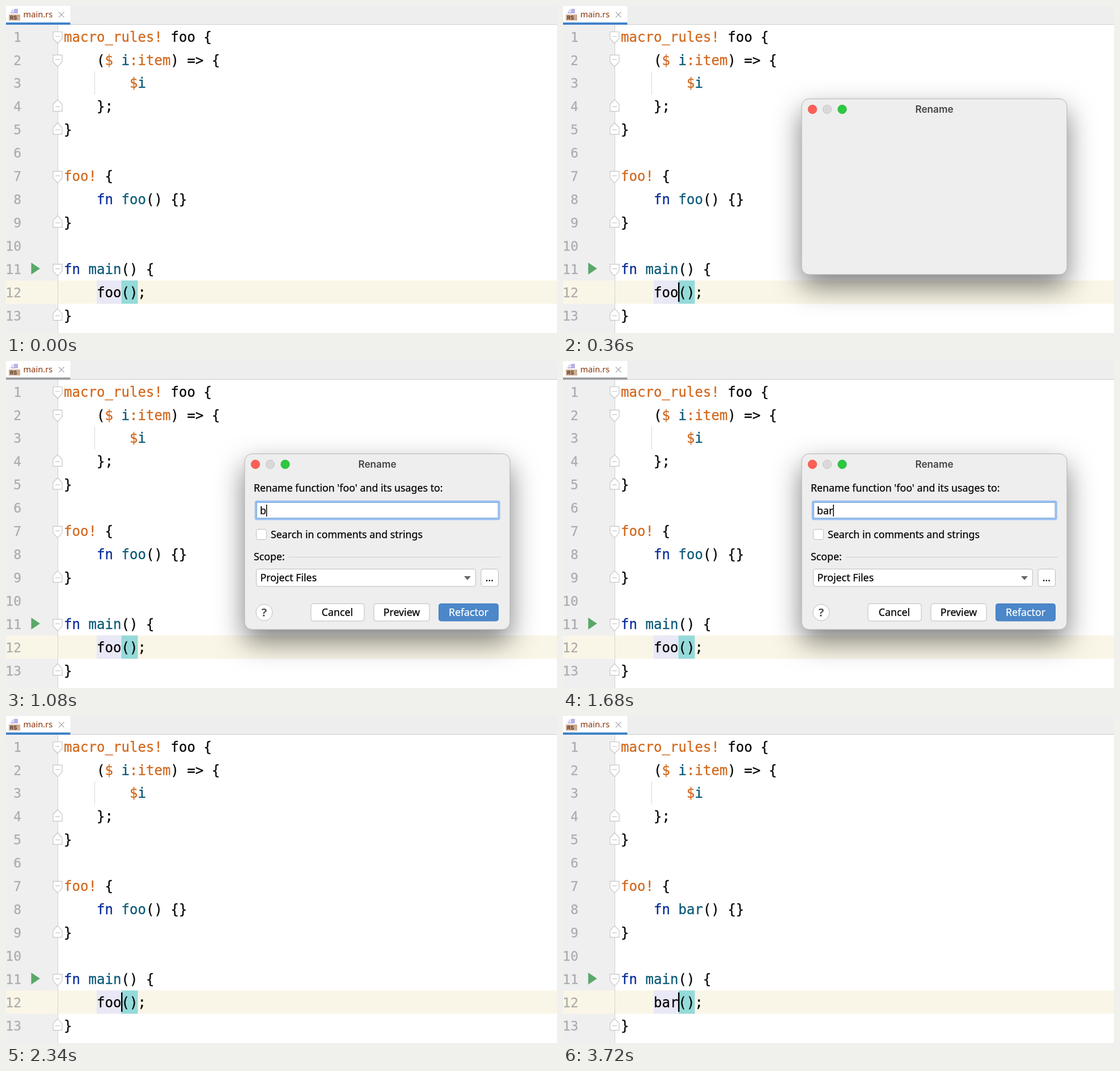
These frames come from a looping animation (972x576 px, 3780 ms). An HTML page:

```html
<!DOCTYPE html>
<html lang="en">
<head>
<meta charset="utf-8">
<title>Rename refactoring</title>
<style>
html, body { margin: 0; width: 100%; height: 100%; overflow: hidden; background: #fff; }
svg { display: block; width: 972px; height: 576px; }
.code { font: 24.08px "DejaVu Sans Mono", monospace; fill: #080808; }
.code text { stroke: #080808; stroke-width: .3px; }
.code .macro { fill: #d2691e; stroke: #d2691e; }
.code .keyword { fill: #0a2f9c; stroke: #0a2f9c; }
.code .name { fill: #0b5a78; stroke: #0b5a78; }
.code .number { font-size: 23px; fill: #adadad; stroke: #adadad; text-anchor: end; }
.ui { font: 17.8px "Noto Sans", sans-serif; fill: #000; }
.ui text { stroke: #000; stroke-width: .25px; }
.center { text-anchor: middle; }
.box { fill: #fff; stroke: #bdbdbd; }
.fold { fill: #fff; stroke: #c6c6c6; stroke-width: 1.2; }
</style>
</head>
<body>
<svg viewBox="0 0 972 576">
  <defs>
    <filter id="shadow" x="-30%" y="-40%" width="160%" height="190%" color-interpolation-filters="sRGB">
      <feDropShadow dx="0" dy="21" stdDeviation="24" flood-color="#000" flood-opacity=".5"/>
    </filter>
  </defs>

  <!-- Editor background -->
  <rect width="972" height="576" fill="#fff"/>
  <rect y="33" width="91" height="543" fill="#efefef"/>
  <rect y="483.5" width="972" height="41" fill="#faf6e7"/>
  <rect x="91" y="33" width="1" height="543" fill="#d0d0d0"/>
  <rect x="160" y="483.5" width="43.5" height="41" fill="#e9e8f6"/>
  <rect x="203.5" y="483.5" width="29" height="41" fill="#95dada"/>
  <rect x="156" y="115" width="1" height="41" fill="#d8d8d8"/>
  <path d="M44.5 452L60 462.5L44.5 473Z" fill="#59a869"/>

  <!-- Tab bar -->
  <rect width="972" height="32" fill="#eee"/>
  <rect y="32" width="972" height="1" fill="#cdcdcd"/>
  <rect width="113.5" height="32" fill="#fff"/>
  <rect id="underline" y="29" width="113.5" height="4"/>
  <path d="M14 5H21V13H8V11H14Z" fill="#b9b1e6"/>
  <path d="M8 10L13 5V10Z" fill="#d3cdf0"/>
  <rect x="5" y="15" width="20" height="10.5" fill="#cfab91"/>
  <text x="7" y="24" font-family="Inter, sans-serif" font-size="9.5" font-weight="700" fill="#5b3a27">RS</text>
  <text class="ui" x="30.5" y="20" style="font-size:14.7px;fill:#8a3208">main.rs</text>
  <path d="M93 10.5L102.5 20M102.5 10.5L93 20" stroke="#adadad" stroke-width="1.2"/>

  <g class="code" id="code"></g>
  <rect id="caret" x="203" y="487" width="2.5" height="34" fill="#000"/>

  <!-- Rename dialog -->
  <g id="dialog">
    <rect x="421" y="163.5" width="468" height="309.5" rx="13" fill="#eee" stroke="#b4b4b4" filter="url(#shadow)"/>
    <circle cx="440" cy="182" r="7.7" fill="#fe5f57" stroke="#e5534b" stroke-width=".8"/>
    <circle cx="466" cy="182" r="7.6" fill="#d9d9d9" stroke="#c5c5c5"/>
    <circle cx="492.5" cy="182" r="7.7" fill="#2bc840" stroke="#25b438" stroke-width=".8"/>
    <text class="center" x="655" y="187.5" font-family="Inter, sans-serif" font-size="17.2" font-weight="600" fill="#444">Rename</text>
    <g class="ui" id="form">
      <text x="437" y="230">Rename function 'foo' and its usages to:</text>
      <rect x="440.5" y="247.5" width="429.5" height="31" rx="2" fill="#fff" stroke="#97c0f0" stroke-width="3.4"/>
      <rect x="442.5" y="249.5" width="425.5" height="27" fill="none" stroke="#86acd8"/>
      <rect id="selection" x="448" y="252" height="23" fill="#a6d2ff"/>
      <text id="field" x="448" y="269.5"></text>
      <rect id="fieldCaret" y="253" width="1.5" height="21" fill="#000"/>
      <rect class="box" x="441.5" y="296.5" width="18" height="18" rx="3"/>
      <text x="467" y="312">Search in comments and strings</text>
      <text x="437" y="351">Scope:</text>
      <rect x="499" y="345" width="374" height="1" fill="#cfcfcf"/>
      <rect class="box" x="441.5" y="366.5" width="387" height="30.5" rx="4"/>
      <text x="448.5" y="388">Project Files</text>
      <path d="M808 379H820L814 386Z" fill="#666"/>
      <rect class="box" x="838" y="366.5" width="30.5" height="30.5" rx="4"/>
      <text class="center" x="853" y="388">...</text>
      <circle class="box" cx="455.5" cy="443" r="14.5"/>
      <text class="center" x="455.5" y="450" style="font-size:20px;font-weight:600;fill:#555;stroke:none">?</text>
      <rect class="box" x="538" y="427.5" width="94" height="30.5" rx="4"/>
      <text class="center" x="584.5" y="449">Cancel</text>
      <rect class="box" x="649" y="427.5" width="98" height="30.5" rx="4"/>
      <text class="center" x="698" y="449">Preview</text>
      <rect x="763.5" y="427.5" width="105" height="30.5" rx="4" fill="#4c87c9" stroke="#457fc0"/>
      <text class="center" x="816" y="449" style="fill:#fff;stroke:#fff">Refactor</text>
    </g>
  </g>
</svg>
<script>
const LOOP = 3780;
const $ = id => document.getElementById(id);
const lineCenter = line => 54 + (line - 1) * 40.93;
const columnX = column => 102 + column * 14.5;

// line, column, text, style
const code = [
  [1, 0, "macro_rules!", "macro"], [1, 13, "foo {"],
  [2, 4, "("], [2, 5, "$", "macro"], [2, 7, "i", "name"], [2, 8, ":item", "macro"], [2, 13, ") => {"],
  [3, 8, "$", "macro"], [3, 9, "i", "name"],
  [4, 4, "};"], [5, 0, "}"],
  [7, 0, "foo!", "macro"], [7, 5, "{"],
  [8, 4, "fn", "keyword"], [8, 7, "foo", "name renamed"], [8, 10, "() {}"],
  [9, 0, "}"],
  [11, 0, "fn", "keyword"], [11, 3, "main", "name"], [11, 7, "() {"],
  [12, 4, "foo", "renamed"], [12, 7, "();"],
  [13, 0, "}"]
];

function textAt(x, line, text, style = "") {
  return `<text x="${x}" y="${lineCenter(line) + 8.6}" class="${style}">${text}</text>`;
}

function foldMarker(line, direction) {
  const y = offset => lineCenter(line) + direction * offset;
  return `<path class="fold" d="M83 ${y(-8.5)}H99V${y(3.5)}L91 ${y(12)}L83 ${y(3.5)}ZM87 ${y(-.5)}H95"/>`;
}

$("code").innerHTML =
  Array.from({ length: 13 }, (_, i) => textAt(27, i + 1, i + 1, "number")).join("") +
  [1, 2, 7, 11].map(line => foldMarker(line, 1)).join("") +
  [4, 5, 9, 13].map(line => foldMarker(line, -1)).join("") +
  code.map(([line, column, text, style]) => textAt(columnX(column), line, text, style)).join("");

const renamed = document.querySelectorAll(".renamed");
const within = (t, start, end) => t >= start && t < end;
const show = (id, visible) => $(id).style.display = visible ? "" : "none";

function typedName(t) {
  if (t < 1020) return "foo";
  return "bar".slice(0, t < 1200 ? 1 : t < 1380 ? 2 : 3);
}

function render(t) {
  const formOpen = within(t, 420, 2340);
  show("dialog", within(t, 360, 2340));
  show("form", formOpen);
  show("caret", within(t, 60, 420) || within(t, 2340, 3240) || t >= 3720);
  $("underline").setAttribute("fill", formOpen ? "#9c9fa3" : "#4083c9");
  renamed.forEach(node => node.textContent = t < 2700 ? "foo" : "bar");

  if (!formOpen) return;
  $("field").textContent = typedName(t);
  const width = $("field").getComputedTextLength();
  $("selection").setAttribute("width", width);
  $("fieldCaret").setAttribute("x", 448 + width);
  show("selection", t < 1020);
  show("fieldCaret", t < 1860);
}

function tick() {
  render(performance.now() % LOOP);
  requestAnimationFrame(tick);
}
tick();
</script>
</body>
</html>
```
